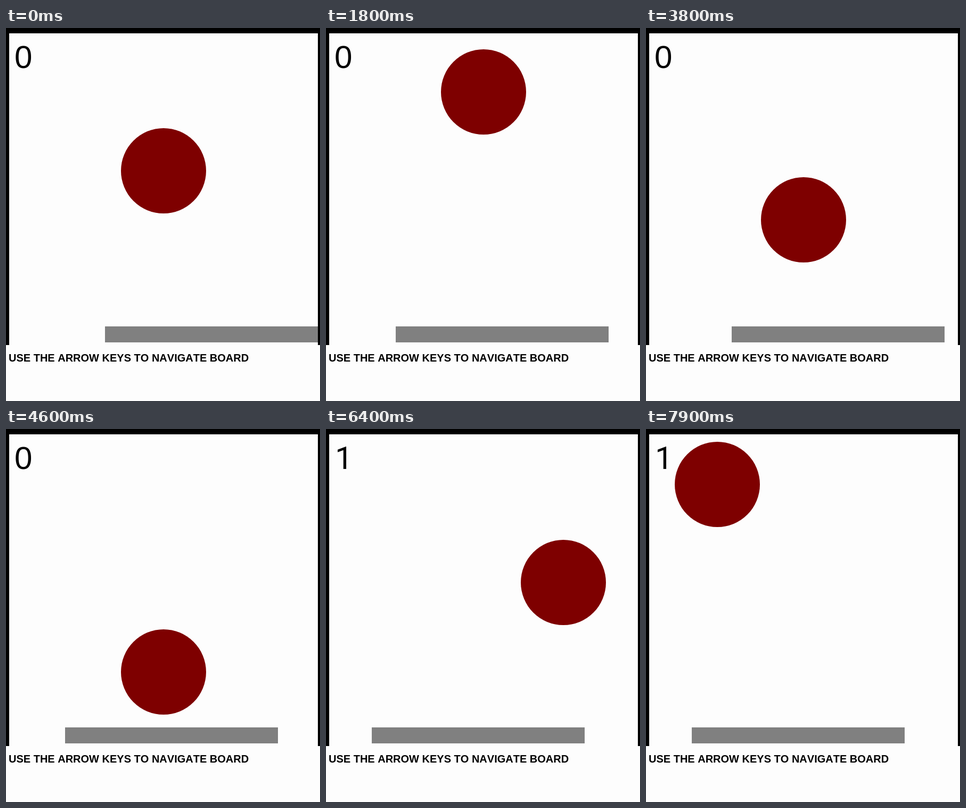
Animation, 590 px wide and 700 px high, one loop 8 s. Source, as an HTML page with a canvas:

```html
<!DOCTYPE html>
<html lang="en">
<head>
<meta charset="utf-8">
<title>Paddle game</title>
<style>
  html, body { margin: 0; width: 100%; height: 100%; overflow: hidden; background: #fdfdfd; }
  canvas { display: block; }
</style>
</head>
<body>
<canvas id="stage" width="590" height="700"></canvas>
<script>
const ctx = document.getElementById('stage').getContext('2d');
const LOOP = 8000, STEP = 100;
const RADIUS = 80, LEFT = 86, RIGHT = 506, TOP = 92, FLOOR = 480;
const HIT = 142;   // game tick at which the ball meets the paddle

// Paddle left edge: [step, x], linear between keys
const paddleKeys = [
  [0, 186], [13, 186], [15, 131], [22, 131], [24, 171], [30, 171],
  [33, 81], [34, 71], [35, 71], [36, 101], [38, 161], [39, 181],
  [43, 181], [45, 141], [49, 21], [50, 6], [57, 6], [60, 86], [80, 86]
];

// Three game ticks per step, with a late start and one catch-up tick
function tickAt(step) {
  return step ? 3 * step - 2 + (step >= 76 ? 1 : 0) : 0;
}

function paddleX(step) {
  const i = Math.max(1, paddleKeys.findIndex(k => k[0] >= step));
  const [s0, x0] = paddleKeys[i - 1], [s1, x1] = paddleKeys[i];
  return Math.round(x0 + (x1 - x0) * (step - s0) / (s1 - s0));
}

function ballY(tick) {
  if (tick < 45) return 268 - 4 * tick;
  if (tick <= HIT) return TOP + 4 * (tick - 45);
  return FLOOR - 4 * (tick - HIT);
}

function ballX(tick) {
  let x = 296, v = -12;
  for (let t = HIT; t < tick; t++) {
    x += v;
    if (x < LEFT || x > RIGHT) {
      x = x < LEFT ? LEFT : RIGHT;
      v = -v;
    }
  }
  return x;
}

function rect(color, x, y, w, h) {
  ctx.fillStyle = color;
  ctx.fillRect(x, y, w, h);
}

function text(str, font, x, y) {
  ctx.font = font;
  ctx.fillStyle = '#000';
  ctx.fillText(str, x, y);
}

function draw(step) {
  const tick = tickAt(step);
  rect('#fdfdfd', 0, 0, 590, 700);

  if (tick < HIT) text('0', '60px "Liberation Sans", Arial, sans-serif', 16, 75);
  else text('1', '59px Roboto, Arial, sans-serif', 17, 75);

  ctx.fillStyle = '#7e0000';
  ctx.beginPath();
  ctx.arc(ballX(tick), ballY(tick), RADIUS, 0, Math.PI * 2);
  ctx.fill();

  rect('#808080', paddleX(step), 560, 400, 30);

  rect('#000', 0, 0, 590, 10);
  rect('#000', 0, 0, 6, 595);
  rect('#000', 586, 0, 4, 595);

  text('USE THE ARROW KEYS TO NAVIGATE BOARD',
    'bold 20px "Liberation Sans", Arial, sans-serif', 5, 626);
}

ctx.fontKerning = 'none';
const start = performance.now();
function frame() {
  draw(Math.floor(((performance.now() - start) % LOOP) / STEP));
  requestAnimationFrame(frame);
}
frame();
</script>
</body>
</html>
```
